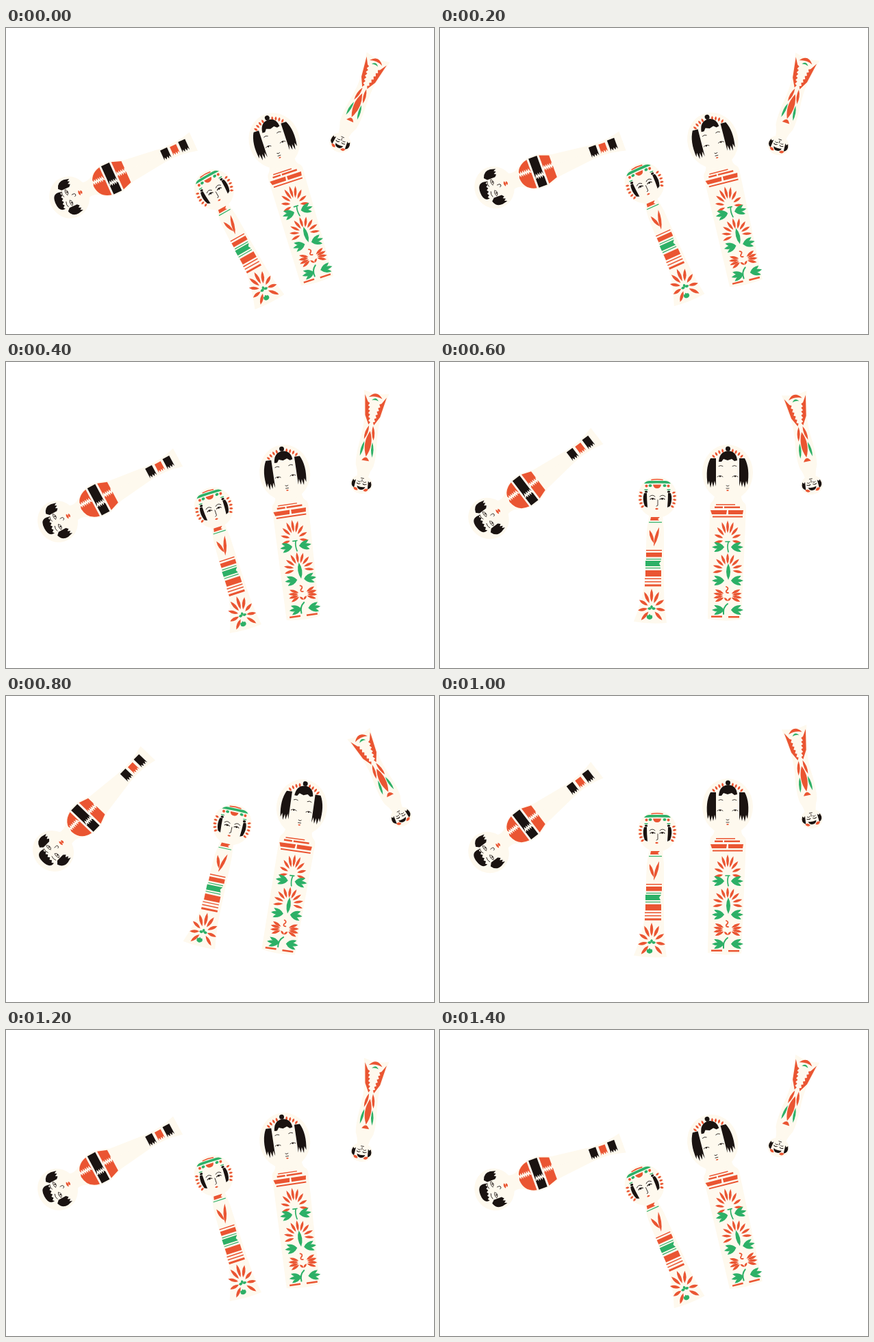
Recreate the animation shown at these times as an HTML page. Size 625 by 448 pixels, loop 1600 ms.

```html
<!DOCTYPE html>
<html lang="en">
<head>
<meta charset="utf-8">
<title>Rocking kokeshi</title>
<style>
html, body { margin: 0; width: 100%; height: 100%; overflow: hidden; background: #fff; }
svg { display: block; width: 100%; height: 100%; }
</style>
</head>
<body>
<svg id="stage" viewBox="0 0 625 448"></svg>
<script>
const RED = '#ea5532', GREEN = '#2db067', BLACK = '#1a1311', CREAM = '#fef9ee';

const shape = (color, d) => `<path fill="${color}" d="${d}"/>`;
const line = (d, w = 0.8, color = BLACK) =>
  `<path fill="none" stroke="${color}" stroke-width="${w}" stroke-linecap="round" d="${d}"/>`;
const bar = (color, x, y, w, h) => shape(color, `M${x} ${y}h${w}v${h}h${-w}z`);
const oval = (color, x, y, rx, ry = rx) =>
  `<ellipse cx="${x}" cy="${y}" rx="${rx}" ry="${ry}" fill="${color}"/>`;
const flip = (axis, art) => art + `<g transform="translate(${2 * axis}) scale(-1 1)">${art}</g>`;
const flipY = art => art + `<g transform="scale(1 -1)">${art}</g>`;

// Lens-shaped petal between two points
function leaf(color, w, x1, y1, x2, y2) {
  const len = Math.hypot(x2 - x1, y2 - y1);
  const nx = (y1 - y2) / len * w, ny = (x2 - x1) / len * w;
  const mx = (x1 + x2) / 2, my = (y1 + y2) / 2;
  return shape(color, `M${x1} ${y1}Q${mx + nx} ${my + ny} ${x2} ${y2}Q${mx - nx} ${my - ny} ${x1} ${y1}z`);
}

// n petals around an ellipse, each reaching from the inner share of the radius to the rim
function fan(color, w, x, y, rx, ry, inner, from, to, n) {
  let art = '';
  for (let i = 0; i < n; i++) {
    const a = (from + (to - from) * i / (n - 1)) * Math.PI / 180;
    const dx = rx * Math.cos(a), dy = ry * Math.sin(a);
    art += leaf(color, w, x + dx * inner, y + dy * inner, x + dx, y + dy);
  }
  return art;
}

// Lying doll: head at the origin, axis along +x
function lyingDoll() {
  const teeth = (color, x, w, h) =>
    shape(color, `M${x} ${-h}h${w}v${2 * h}` + `l${-w / 6} -4l${-w / 6} 4`.repeat(3) + 'z');
  const zigzag = (x, y, n) => line(`M${x} ${y}` + 'l1.5 -4l1.5 4'.repeat(n), 1.8, CREAM);
  return flipY(
      shape(CREAM, 'M24 1V-13Q33 -9 42 -15Q54 -25 68 -25Q82 -24 95 -17L150 -10.5Q175 -8 199 -15V1z')) +
    oval(CREAM, 0, 0, 29, 31) +
    shape(BLACK, 'M-12 -13Q-22 -14 -22 0Q-22 14 -12 13' + 'l-2 -3l3 -2'.repeat(5) + 'z') +
    flipY(
      shape(BLACK, 'M-10 -18Q-7 -28 3 -27L11 -25' + 'l-4 2l3 2'.repeat(2) + 'l-3 3H-6z') +
      line('M-7 -12Q-9 -8 -7 -4') + line('M-1 -13Q-4 -8 -1 -4M0 -12Q3 -8 0 -5') + oval(BLACK, 0, -8.5, 1)) +
    line('M5 -2Q10 -3 10 0Q10 2 8 2') +
    leaf(RED, 3, 16, -4, 16, 4) + leaf(RED, 3, 19, -3, 19, 3) +
    shape(RED, 'M58 -22Q40 -18 39 0Q40 18 58 22z') +
    bar(BLACK, 61, -22.5, 13, 45) +
    shape(RED, 'M77 -22L91 -17V17L77 22z') +
    zigzag(39, -3, 6) + zigzag(62, 8, 4) + zigzag(77, 0, 5) +
    teeth(BLACK, 149, 11, 8) + teeth(RED, 164, 10, 7) + teeth(BLACK, 178, 11, 8.5);
}

function slimDoll() {
  const x = 317.5;
  return shape(CREAM, 'M306 222L302 246L298 330Q293 355 283 380Q307 384 331 382Q327 355 327 330V246L325 222z') +
    oval(CREAM, x, 198, 28.5, 30) +
    line('M309 172.5Q317 171 325 172.5', 1.6, RED) +
    shape(GREEN, 'M298 178Q301 174 306 174H329Q334 174 337 178Q317 177 298 178z') +
    shape(RED, 'M311 179.5h12q-1 5.5 -6 5.5t-6 -5.5z') +
    flip(x,
      oval(GREEN, 307, 181, 2.5, 2) + oval(RED, 301.5, 181.5, 2) +
      line('M299 187h4', 1.3, GREEN) + oval(BLACK, 301, 190, 2.2, 1.6) +
      shape(BLACK, 'M298 192h4Q302 202 303 213L299 211Q295 201 298 192z') +
      line('M306 197Q310 193 314 197') + line('M307 201Q310 198 314 201', 1.1) + oval(BLACK, 310.5, 200.5, 1.3) +
      fan(RED, 3, x, 199, 28, 28, 0.8, 150, 198, 5)) +
    line('M318 202V210L316 211') + leaf(RED, 2.5, 314, 215, 319, 215) +
    shape(RED, 'M308 227h13l-3 3l2 2h-13z') + bar(GREEN, 305, 234, 19, 1.2) +
    leaf(RED, 4.5, 306, 246, 312, 265) + leaf(RED, 4.5, 320, 242, 312, 270) +
    bar(RED, 301, 275, 23, 1.5) + bar(RED, 301, 279, 23, 6.5) +
    bar(GREEN, 301, 288, 22, 1.2) + shape(GREEN, 'M300 291h23l-3 4l2 4h-22z') + bar(GREEN, 300, 301, 22, 1.2) +
    bar(RED, 300, 305, 23, 9) + bar(RED, 299, 316.5, 24, 1.5) + bar(RED, 299, 321, 24, 1.5) + bar(RED, 299, 325.5, 24, 3) +
    fan(RED, 4.5, 309, 360, 20, 28, 0.3, -220, 40, 9) +
    fan(GREEN, 4, 309, 361, 6, 5, 0, 180, 360, 3) + fan(GREEN, 5, 306, 377, 6, 8, 0, -125, -55, 3);
}

function tallDoll() {
  const x = 420;
  const fronds = y => flip(x, fan(GREEN, 5, 403 + 12, y, 18, 12, 0, 145, 215, 3));
  return shape(CREAM, 'M401 196Q400 203 396 206Q394 208 394 214L391 376Q415 381 440 377L447 214Q447 208 444 206Q440 203 440 196z') +
    oval(CREAM, x, 162, 37, 41) +
    flip(x,
      shape(BLACK, 'M395 141h8v41' + 'l-2 -8l-2 9'.repeat(2) + 'l-2 -10l-2 6Q387 156 395 141z') +
      fan(RED, 3, x, 162, 33, 36, 0.82, -133, -104, 4) +
      line('M407 152.5q3 -2 6 0M405 168q4 -3 8 0') + oval(BLACK, 409, 167.5, 1.1)) +
    oval(BLACK, 420.5, 127, 3.5, 3.5) +
    shape(BLACK, 'M407 146Q408 131 421 130Q433 131 434 144l-4 1l-4 -3l-6 2l-6 -2l-3 4z') +
    line('M418 181q2 2 4 0M418 185h4') + leaf(RED, 2, 418, 188, 422, 188) +
    bar(RED, 403, 208, 28, 1.5) + bar(RED, 401, 211.5, 12, 2.5) + bar(RED, 415, 211.5, 23, 2.5) +
    shape(RED, 'M395 217h24l-1 6h-21zM421 217h22l-1 6h-21z') + bar(RED, 398, 225.5, 44, 2) +
    // upper flower
    fan(RED, 3.8, x, 260, 20, 28, 0.35, -190, 10, 9) +
    line('M417 263h6M421 264q-2 6 0 14', 1.7, GREEN) + fronds(271) +
    // middle flower
    fan(RED, 3.8, x, 304, 22, 24, 0.35, -190, 10, 9) +
    leaf(GREEN, 6, 421, 295, 421, 319) + fronds(320) +
    // lower flower
    line('M418 329q5 2 0 6q-1 3 3 3', 1.8, RED) +
    flip(x, fan(RED, 4, x, 342, 21, 18, 0.32, 150, 210, 4) + leaf(RED, 3, 415, 345, 420, 350)) +
    line('M414 369Q413 359 420 354', 2, GREEN) + fronds(363) +
    bar(RED, 396, 371.5, 16, 2.5) + bar(RED, 421, 372, 16, 2.5);
}

// Upside-down doll: head at the origin, base at the top
function tinyDoll() {
  return flip(0, shape(CREAM, 'M-1 -12H8Q9 -20 13 -28Q15 -40 13 -60Q10 -85 12 -100L18.5 -137Q8 -134 -1 -134z')) +
    oval(CREAM, 0, 0, 16, 14) +
    flip(0,
      shape(BLACK, 'M9 -6l2 2l2 -2Q17 3 10 6z') +
      leaf(RED, 4, 4, 9, 11, 6) + line('M2 -1q2 2 5 0', 1) + line('M2 -4q2 2 4 0') +
      leaf(GREEN, 3.5, 6, -63, 9, -41) + leaf(RED, 4, 3, -87, 7, -66) +
      shape(RED, 'M16 -131L11 -101L4 -88' + 'l-2 -4l3 -1.5'.repeat(6) + 'z')) +
    shape(BLACK, 'M-6 3Q0 5 6 3Q5 8 0 8Q-5 8 -6 3z') +
    line('M0 -4v-3M-2 -9h4') +
    shape(RED, 'M-5.5 -35Q0 -45 5.5 -35z') +
    leaf(RED, 9, 0, -79, 0, -41) +
    shape(RED, 'M-10 -128Q0 -141 10 -128Q0 -132 -10 -128z') +
    shape(GREEN, 'M-5 -124Q0 -131 5 -124Q0 -126 -5 -124z');
}

// Key poses: head x, head y, rotation; home: the head in the artwork
const dolls = [
  { art: lyingDoll(), home: [0, 0],
    poses: [[92.5, 248, -24.3], [79.5, 233.5, -20], [75.5, 233.5, -28.1], [71, 229, -37.3], [69, 227, -46]] },
  { art: slimDoll(), home: [317, 197],
    poses: [[303, 236, -29.5], [297.5, 226.5, -24.3], [302.5, 212.5, -18], [317, 197, 0], [330, 187, 12]] },
  { art: tallDoll(), home: [420, 161],
    poses: [[391.5, 164, -18.2], [398, 163.5, -14.3], [407, 161, -8.4], [420, 161, 0], [432, 162, 8]] },
  { art: tinyDoll(), home: [0, 0],
    poses: [[488, 168, 24], [494, 172, 18.2], [519, 179, 9.3], [543, 180, -10.9], [577, 177, -27]] }
];

const stage = document.getElementById('stage');
stage.innerHTML = dolls.map(d => `<g>${d.art}</g>`).join('');
const groups = [...stage.children];

// Five poses, held 200 ms each, played forth and back
function draw(now) {
  const pose = 4 - Math.abs(4 - Math.floor(now / 200) % 8);
  dolls.forEach(({ home: [hx, hy], poses }, i) => {
    const [x, y, turn] = poses[pose];
    groups[i].setAttribute('transform', `translate(${x} ${y}) rotate(${turn}) translate(${-hx} ${-hy})`);
  });
  requestAnimationFrame(draw);
}
draw(performance.now());
</script>
</body>
</html>
```
